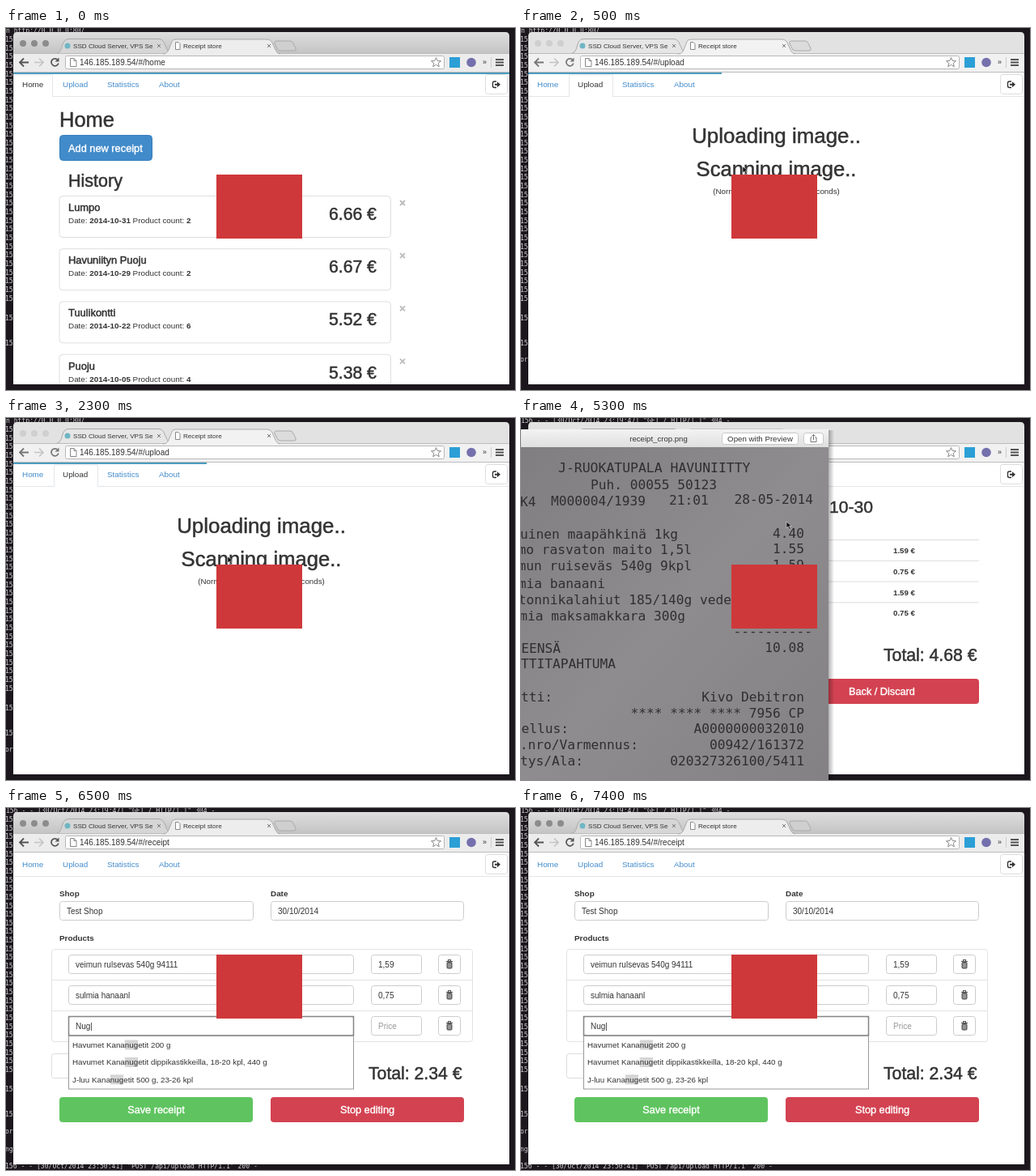
Animation, 629 px wide and 447 px high, one loop 8 s. Source, as an HTML page:

```html
<!DOCTYPE html>
<html lang="en">
<head>
<meta charset="utf-8">
<title>Receipt store</title>
<style>
html, body { margin: 0; width: 100%; height: 100%; overflow: hidden; background: #1b171d; }
svg { display: block; width: 629px; height: 447px; }
text { font-family: "Liberation Sans", Arial, sans-serif; fill: #333; white-space: pre; }
.mono { font-family: "DejaVu Sans Mono", "Liberation Mono", monospace; }
.term { fill: #d0ced1; }
.slip { fill: #2f2e30; }
.b { font-weight: bold; }
.h { stroke: #333; stroke-width: .5; }
.btn { fill: #fff; stroke: #fff; stroke-width: .4; }
.link { fill: #428bca; }
.dim { fill: #999; }
</style>
</head>
<body>
<svg id="stage" viewBox="0 0 629 447">
  <defs>
    <clipPath id="win"><path d="M9 440V10q0-5 5-5H617q5 0 5 5V440z"/></clipPath>
    <linearGradient id="strip" x2="0" y2="1"><stop stop-color="#dedede"/><stop offset="1" stop-color="#c3c3c3"/></linearGradient>
    <linearGradient id="bar" x2="0" y2="1"><stop stop-color="#f3f3f3"/><stop offset="1" stop-color="#dedede"/></linearGradient>
    <linearGradient id="paper" x2="1" y2="1"><stop stop-color="#807e81"/><stop offset=".5" stop-color="#8e8c8f"/><stop offset="1" stop-color="#838184"/></linearGradient>
    <linearGradient id="edge"><stop stop-color="#000" stop-opacity=".3"/><stop offset="1" stop-color="#000" stop-opacity="0"/></linearGradient>
  </defs>
</svg>
<script>
const LOOP = 8000;
const stage = document.getElementById('stage');

const esc = s => s.replace(/&/g, '&amp;').replace(/</g, '&lt;');
const text = (x, y, size, str, cls = '', anchor = 'start') =>
  `<text x="${x}" y="${y}" font-size="${size}" class="${cls}" text-anchor="${anchor}">${esc(str)}</text>`;
const rect = (x, y, w, h, fill, stroke = 'none', r = 0) =>
  `<rect x="${x}" y="${y}" width="${w}" height="${h}" rx="${r}" fill="${fill}" stroke="${stroke}"/>`;
const path = (d, stroke, width = 1, fill = 'none') =>
  `<path d="${d}" stroke="${stroke}" stroke-width="${width}" fill="${fill}"/>`;
const disc = (x, y, r, fill) => `<circle cx="${x}" cy="${y}" r="${r}" fill="${fill}"/>`;
const button = (x, y, w, fill, label) =>
  rect(x, y, w, 31, fill, 'none', 4) + text(x + w / 2, y + 20, 12.7, label, 'btn', 'middle');
const field = (x, y, w, str = '', cls = '') =>
  rect(x + .5, y + .5, w, 23, '#fff', '#ccc', 3) + text(x + 9, y + 16, 10, str, cls);
const term = (x, y, str) => text(x, y, 8.1, str, 'mono term');
const pointer = (x, y) => path(`M${x} ${y}v8l2-2 2 4 1.500-1-2-3.500h3z`, '#fff', .5, '#111');

function terminal(top, rows, extra) {
  let s = term(0, 5.5, top);
  for (let i = 0; i < rows; i++) s += term(-1, 17 + i * 10.65, '15');
  for (const [y, str] of extra) s += term(-1, y, str);
  return s;
}

function browser(url, active, page, load = 0, focused = true) {
  const ink = focused ? '#555' : '#777';
  let s = rect(9, 5, 613, 27, focused ? 'url(#strip)' : '#e2e2e2');
  for (const x of [21, 35, 49]) s += disc(x, 19, 4, focused ? '#8c8c8c' : '#cfcfcf');
  s += path('M62 31.500q4 0 6-5l3-9q2-4 6-4H189q4 0 6 4l4 9q2 5 6 5', '#aaa', 1, focused ? '#d6d6d6' : '#e6e6e6');
  s += disc(76, 22, 3.5, '#6fb6c4') + text(83, 25, 8.1, 'SSD Cloud Server, VPS Se');
  s += path('M336 27l-4-8q-1-3 3-3h16q3 0 4 3l3 6q1 3-2 3h-17z', '#aaa', 1, focused ? '#cfcfcf' : '#dcdcdc');
  s += rect(9, 31, 613, 24, focused ? '#ececec' : '#f1f1f1') + path('M9 31.500H622M9 54.500H622', '#bcbcbc');
  s += path('M194 32q5 0 7-5l4-10q1-3 5-3H323q4 0 6 4l4 9q2 5 6 5', '#aaa', 1, focused ? '#ededed' : '#f2f2f2');
  s += path('M209.500 17.500h3.500l2 2v7h-5.500z', '#888', 1, '#fff') + text(219, 25, 8.1, 'Receipt store');
  for (const x of [189, 325]) s += path(`M${x - 2} 20l4 4m0-4l-4 4`, '#777');
  s += path('M28 42.500H17m5-5l-5 5 5 5', ink, 1.8) + path('M35 42.500H46m-5-5l5 5-5 5', '#c4c4c4', 1.6);
  s += path('M64 39.500a4.500 4.500 0 1 0 .8 4', ink, 1.7) + path('M65.500 36.500v5h-5z', 'none', 0, ink);
  s += rect(73.5, 34.5, 468, 16, '#fff', '#b8b8b8', 2);
  s += path('M79.500 37.500h4.500l3 3v7h-7.500zM84 37.500v3h3', '#888', 1, '#fff');
  s += text(91, 46, 10.03, '146.185.189.54/#/' + url);
  s += path('M531.500 36.500l1.700 4 4.300.3-3.300 2.700 1.100 4.200-3.800-2.300-3.800 2.300 1.100-4.200-3.300-2.700 4.300-.3z', '#888', 1, '#fff');
  s += rect(548, 36, 13, 13, '#2b9fd6') + disc(575, 42.5, 5.8, '#7470ad');
  s += text(589, 45, 9, '»') + path('M599.500 36v13', '#ccc');
  s += path('M605 39h10M605 42.500h10M605 46h10', '#555', 1.8);
  s += rect(9, 55, 613, 385, '#fff') + path('M9 84.500H622', '#e3e6ea');
  if (load) s += rect(9, 55, load, 2, '#4a9cc0');
  const tabs = [['Home', 20, 9, 48], ['Upload', 70, 59, 54], ['Statistics', 125, 114, 62], ['About', 189, 178, 48]];
  for (const [name, x, left, w] of tabs) {
    const on = name === active;
    if (on) s += path(`M${left + .5} 85V58h${w}v27`, '#e3e6ea', 1, '#fff');
    s += text(x, 73.3, 9.9, name, on ? '' : 'link');
  }
  s += rect(592.5, 57.5, 27, 24, '#fff', '#ddd', 3);
  s += path('M606 66h-2.500q-2 0-2 2v3.500q0 2 2 2h2.500', '#333', 1.4);
  s += path('M604 68.800h3v-2.500l4 3.500-4 3.500v-2.500h-3z', 'none', 0, '#333');
  return `<g clip-path="url(#win)">${s}${page}</g>`;
}

function homePage() {
  let s = text(66, 121.5, 25.5, 'Home', 'h');
  s += rect(66.5, 132.5, 114, 31, '#428bca', '#357ebd', 4) + text(77, 152.5, 12.8, 'Add new receipt', 'btn');
  s += text(77, 196, 21.5, 'History', 'h');
  const shops = [
    ['Lumpo', '10-31', 2, '6.66'], ['Havuniityn Puoju', '10-29', 2, '6.67'],
    ['Tuulikontti', '10-22', 6, '5.52'], ['Puoju', '10-05', 4, '5.38']
  ];
  shops.forEach(([name, day, count, sum], i) => {
    const y = 207 + i * 65.2;
    s += rect(66, y + .5, 409.5, 51, '#fff', '#dedede', 4) + text(77, y + 19, 12.9, name, 'h');
    s += `<text x="77" y="${y + 34}" font-size="9.9">Date: <tspan class="b">2014-${day}</tspan> Product count: <tspan class="b">${count}</tspan></text>`;
    s += text(399, y + 30, 21.2, sum + ' €', 'h');
    s += path(`M487 ${y + 6}l6 6m0-6l-6 6`, '#bbb', 1.8);
  });
  return s;
}

const uploadPage = () =>
  text(315.5, 142, 25.9, 'Uploading image..', 'h', 'middle') +
  text(315.5, 183, 25.6, 'Scanning image..', 'h', 'middle') +
  text(315.5, 204.5, 9.75, '(Normally takes around 10 seconds)', '', 'middle') +
  pointer(274, 171);

function totalsPage() {
  let s = text(435, 117, 21.1, '10-30', 'h', 'end');
  ['1.59', '0.75', '1.59', '0.75'].forEach((p, i) => {
    const y = 150.5 + i * 25.8;
    s += path(`M326 ${y}H566`, '#ddd') + text(460, y + 16.5, 9.7, p + ' €', 'b');
  });
  return s + text(448, 300, 21.2, 'Total: 4.68 €', 'h') + button(326, 322, 240, '#d34251', 'Back / Discard');
}

function preview() {
  let s = rect(380, 15, 7, 432, 'url(#edge)') + rect(0, 14, 380, 23, 'url(#bar)') + rect(0, 36, 380, 411, 'url(#paper)');
  s += text(170, 28.5, 9.6, 'receipt_crop.png', '', 'middle');
  s += rect(248.5, 18.5, 94, 14, '#fff', '#c8c8c8', 3) + text(295.5, 28.7, 9.7, 'Open with Preview', '', 'middle');
  s += rect(349.5, 18.5, 24, 14, '#fff', '#c8c8c8', 3);
  s += path('M359.500 24h-1.500v5.500h7v-5.500h-1.500M361.500 27v-6.500m-2 2l2-2 2 2', '#666', .9);
  const slip = (x, y, str, anchor = 'start') => text(x, y, 16.2, str, 'mono slip', anchor);
  s += text(46, 67, 16.45, 'J-RUOKATUPALA HAVUNIITTY', 'mono slip') + slip(86, 88, 'Puh. 00055 50123');
  s += slip(-1, 109, 'K4') + slip(37, 108, 'M000004/1939') + slip(183, 107, '21:01') + slip(361, 106, '28-05-2014', 'end');
  // left text, its right end, baseline, right text
  const rows = [
    ['uinen maapähkinä 1kg', 194, 149, '4.40'], ['mo rasvaton maito 1,5l', 211, 168, '1.55'],
    ['mun ruiseväs 540g 9kpl', 211, 188, '1.59'], ['mia banaani', 104, 210, '0.75'],
    ['tonnikalahiut 185/140g vede', 260, 230, '0.99'], ['mia maksamakkara 300g', 203, 250, '0.80'],
    ['YHTEENSÄ', 49, 290, '10.08'], ['KORTTITAPAHTUMA', 117, 309, ''],
    ['Kortti:', 39, 350, 'Kivo Debitron'], ['', 0, 370, '**** **** **** 7956 CP'],
    ['Sovellus:', 59, 389, 'A0000000032010'], ['o.nro/Varmennus:', 145, 409, '00942/161372'],
    ['itys/Ala:', 77, 429, '020327326100/5411']
  ];
  for (const [left, end, y, right] of rows)
    s += slip(end, y, left, 'end') + slip(350, y - (y < 300 ? 1.5 : 0), right, 'end');
  return s + slip(360, 269, '----------', 'end') + pointer(328, 128);
}

function editPage() {
  const bold = (x, y, str) => text(x, y, 9.9, str, 'b');
  let s = bold(66, 108.5, 'Shop') + bold(327, 108.5, 'Date') + bold(66, 163.5, 'Products');
  s += field(66, 115, 239, 'Test Shop') + field(327, 115, 238, '30/10/2014');
  s += rect(56.5, 174.5, 520, 114, '#fff', '#e2e2e2', 3) + path('M56 212.500H577M56 250.500H577', '#e2e2e2');
  s += rect(56.5, 303.5, 200, 30, '#fff', '#ddd', 3);
  [['veimun rulsevas 540g 94111', '1,59'], ['sulmia hanaanl', '0,75'], ['Nug|', 'Price']].forEach(([name, price], i) => {
    const y = 181 + i * 38;
    s += field(77, y, 352, name) + field(451, y, 62, price, i === 2 ? 'dim' : '');
    s += rect(534.5, y + .5, 27, 23, '#fff', '#ccc', 3);
    s += path(`M544 ${y + 8.500}h8M546.500 ${y + 8}v-1.500h3v1.500`, '#555', 1.2);
    s += rect(545, y + 9.5, 6, 7.5, '#777', '#555', 1) + path(`M547 ${y + 11}v5m2-5v5`, '#ddd', .6);
  });
  s += path('M77.500 257.500H429.500V281H77.500z', '#858585', 1.5);
  s += rect(77.5, 281.5, 352, 65.5, '#fff', '#999');
  const hits = [
    ['Havumet Kananugetit 200 g', 146.8], ['Havumet Kananugetit dippikastikkeilla, 18-20 kpl, 440 g', 146.8],
    ['J-luu Kananugetit 500 g, 23-26 kpl', 128.8]
  ];
  hits.forEach(([str, x], i) => {
    const y = 296 + i * 21.4;
    s += rect(x, y - 9.5, 16.3, 12, '#d5d5d5') + text(82, y, 9.8, str);
  });
  s += text(448, 335, 21.2, 'Total: 2.34 €', 'h');
  return s + button(66, 357, 239, '#5fc45f', 'Save receipt') + button(327, 357, 239, '#d34251', 'Stop editing');
}

const get = '156 - - [30/Oct/2014 23:19:47] "GET / HTTP/1.1" 304 -';
const post = '156 - - [30/Oct/2014 23:50:41] "POST /api/upload HTTP/1.1" 200 -';
const serve = 'n http://0.0.0.0:80/';

// start time and picture; each opaque scene covers the ones before it
const scenes = [
  [0, terminal(serve, 31, [[361, '15'], [392, '15']]) + browser('home', 'Home', homePage(), 613)],
  [500, terminal(serve, 31, [[361, '15'], [392, '15'], [412, 'or']]) +
    browser('upload', 'Upload', uploadPage(), 239, false)],
  [3500, terminal(get, 0, []) + browser('receipt', '', totalsPage(), 0, false) + preview()],
  [6500, terminal(get, 30, [[350, '15'], [381, '15'], [402, 'or'], [424, 'ng'], [445, post]]) +
    browser('receipt', '', editPage())]
];

const backdrop = rect(0, 0, 629, 447, '#1b171d');
stage.insertAdjacentHTML('beforeend',
  scenes.map(([start, art]) => `<g class="scene" opacity="${start ? 0 : 1}">${backdrop}${art}</g>`).join('') +
  rect(260, 181, 106, 79, '#cf383a'));

stage.querySelectorAll('.scene').forEach((g, i) => {
  const offset = scenes[i][0] / LOOP;
  if (!offset) return;
  g.animate([
    { opacity: 0, offset: 0 }, { opacity: 0, offset },
    { opacity: 1, offset }, { opacity: 1, offset: 1 }
  ], { duration: LOOP, iterations: Infinity });
});
</script>
</body>
</html>
```
